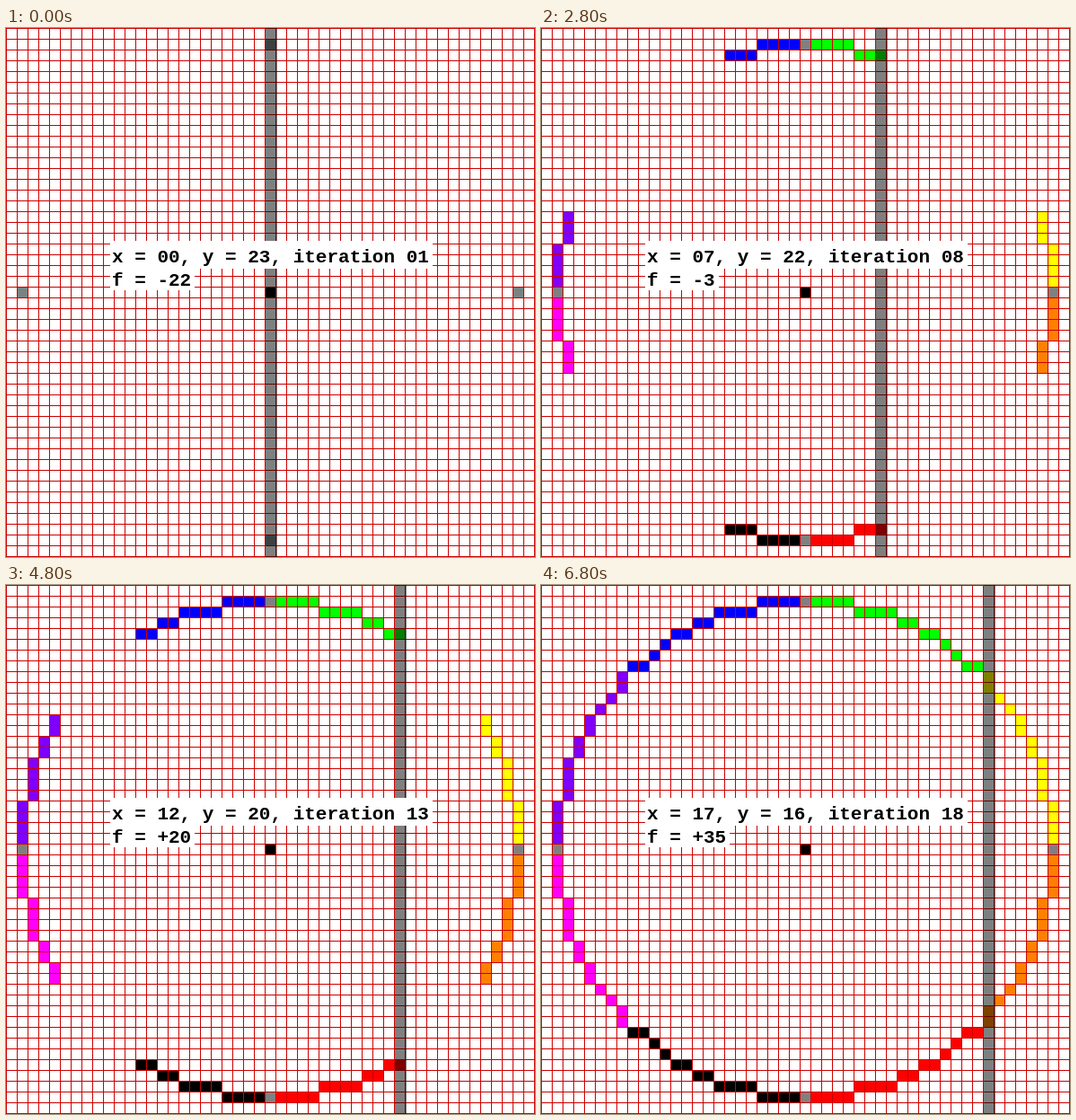
Animation, 589 px wide and 589 px high, one loop 8 s. Source, as an HTML page with a canvas:

```html
<!DOCTYPE html>
<html lang="en">
<head>
<meta charset="utf-8">
<title>Midpoint circle algorithm</title>
<style>
  html, body { margin: 0; width: 100%; height: 100%; overflow: hidden; background: #fff; }
  canvas { display: block; }
</style>
</head>
<body>
<canvas id="stage" width="589" height="589"></canvas>
<script>
const ctx = document.getElementById('stage').getContext('2d');
const SIZE = 589, CELL = 12, CENTER = 24, RADIUS = 23;
const STEP_MS = 400, LOOP_MS = 8000;

// Every state of the algorithm: position and decision value.
function traceCircle(radius) {
  const steps = [];
  let x = 0, y = radius, f = 1 - radius;
  steps.push({ x, y, f });
  while (x < y) {
    if (f >= 0) {
      y--;
      f -= 2 * y;
    }
    x++;
    f += 2 * x + 1;
    steps.push({ x, y, f });
  }
  return steps;
}

const steps = traceCircle(RADIUS);

function drawGrid() {
  ctx.fillStyle = '#fff';
  ctx.fillRect(0, 0, SIZE, SIZE);
  ctx.fillStyle = '#c00';
  for (let p = 0; p < SIZE; p += CELL) {
    ctx.fillRect(p, 0, 1, SIZE);
    ctx.fillRect(0, p, SIZE, 1);
  }
}

function plot(x, y, color) {
  ctx.fillStyle = color;
  ctx.fillRect((CENTER + x) * CELL + 1, (CENTER + y) * CELL + 1, CELL - 1, CELL - 1);
}

function plotOctants({ x, y }) {
  const gray = x === 0 && '#808080';
  plot(x, -y, gray || '#0f0');
  plot(y, -x, gray || '#ff0');
  plot(-x, -y, gray || '#00f');
  plot(-y, -x, gray || '#8000ff');
  plot(-y, x, gray || '#f0f');
  plot(-x, y, gray || '#000');
  plot(x, y, gray || '#f00');
  plot(y, x, gray || '#ff8000');
}

function label(text, baseline, top, bottom) {
  const left = 118;
  const right = left + Math.ceil(ctx.measureText(text).actualBoundingBoxRight) + 4;
  ctx.fillStyle = '#fff';
  ctx.fillRect(left - 2, top, right - left + 2, bottom - top);
  ctx.fillStyle = '#000';
  ctx.fillText(text, left, baseline);
}

const twoDigits = n => String(n).padStart(2, '0');

function draw(index) {
  const { x, y, f } = steps[index];
  drawGrid();
  steps.slice(0, index + 1).filter(s => s.x < s.y).forEach(plotOctants);
  plot(0, 0, '#000');

  ctx.fillStyle = 'rgba(0, 0, 0, 0.5)';
  ctx.fillRect((CENTER + x) * CELL + 1, 0, CELL + 1, SIZE);

  ctx.font = 'bold 21px "Liberation Mono", monospace';
  label(`x = ${twoDigits(x)}, y = ${twoDigits(y)}, iteration ${twoDigits(index + 1)}`, 261, 237, 268);
  label(`f = ${f > 0 ? '+' : ''}${f}`, 287, 268, 292);
}

function tick() {
  const time = performance.now() % LOOP_MS;
  draw(Math.min(Math.floor(time / STEP_MS), steps.length - 1));
  requestAnimationFrame(tick);
}
tick();
</script>
</body>
</html>
```
